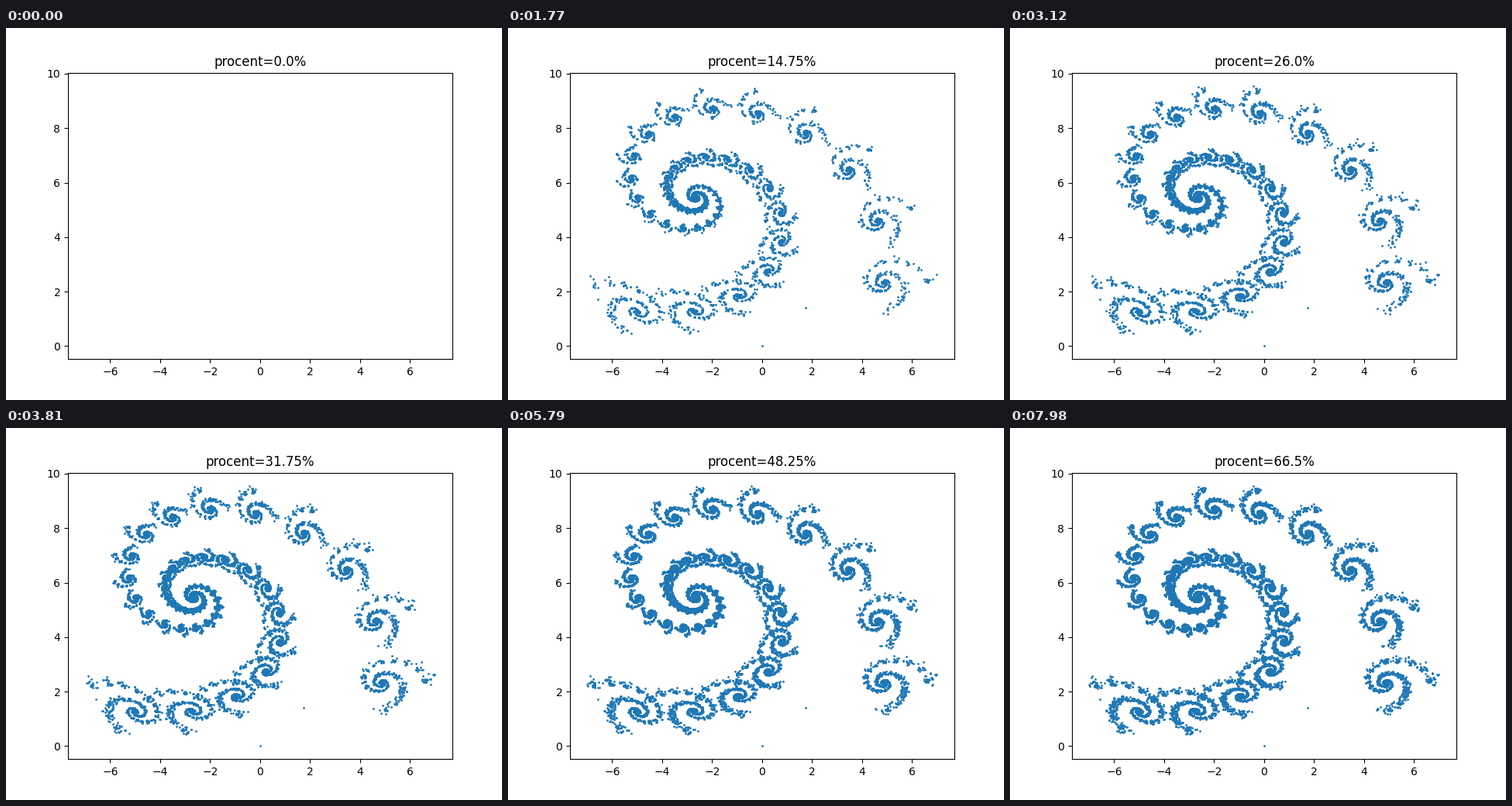
Animation, 640 px wide and 480 px high, one loop 8 s. Source, as a matplotlib script:

```python
import numpy as np
import matplotlib.pyplot as plt
from matplotlib.animation import FuncAnimation

STEPS = 400       # steps for the full 100 %
PER_STEP = 100    # points added per step
SHOWN = 267       # steps in one loop
RARE = 0.04       # chance of each of the two small maps


def grow(x, y):
    return (208 * x - 112 * y) / 264 + 1.758647, (64 * x + 227 * y) / 264 + 1.408065


def left_copy(x, y):
    return (-32 * x + 68 * y) / 264 - 6.721654, (40 * x + 14 * y) / 264 + 1.377236


def right_copy(x, y):
    return (48 * x - 36 * y) / 264 + 6.086107, (24 * x + 48 * y) / 264 + 1.568035


def chaos_game(count, seed=4):
    """Spiral fractal: apply a randomly chosen affine map again and again."""
    rng = np.random.default_rng(seed)
    maps = [grow, left_copy, right_copy]
    picks = rng.choice(3, size=count, p=[1 - 2 * RARE, RARE, RARE])
    picks[:3] = 0, 1, 0
    points = [(0.0, 0.0)]
    for k in picks[:-1]:
        points.append(maps[k](*points[-1]))
    return np.array(points)


points = chaos_game(SHOWN * PER_STEP)

fig, ax = plt.subplots(figsize=(6.4, 4.8), dpi=100)
dots, = ax.plot([], [], "o", color="#1f77b4", markersize=1)
ax.set_xlim(-7.689, 7.701)
ax.set_ylim(-0.478, 10.039)
title = ax.set_title("procent=0.0%")


def update(step):
    seen = points[:step * PER_STEP]
    dots.set_data(seen[:, 0], seen[:, 1])
    title.set_text(f"procent={step / STEPS * 100}%")
    return dots, title


anim = FuncAnimation(fig, update, frames=SHOWN, interval=30,
                     repeat=True, repeat_delay=0, blit=False)
plt.show()
```
